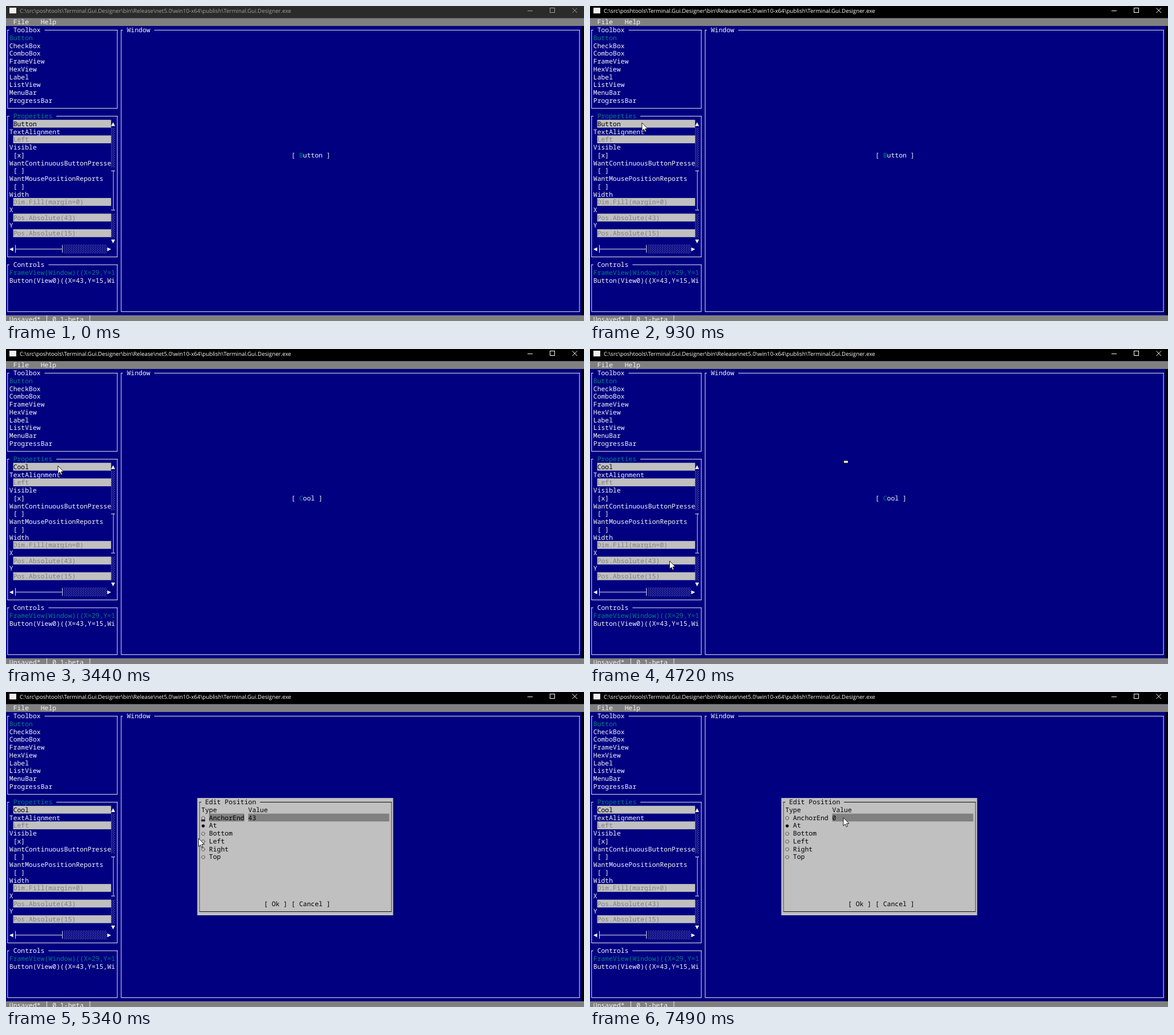
These frames come from a looping animation (1013x553 px, 8000 ms). An HTML page with a canvas:

```html
<!DOCTYPE html>
<html lang="en">
<head>
<meta charset="utf-8">
<title>Terminal designer</title>
<style>
html, body { margin: 0; width: 100%; height: 100%; overflow: hidden; background: #000080; }
canvas { display: block; width: 1013px; height: 553px; }
</style>
</head>
<body>
<canvas id="stage"></canvas>
<script>
const W = 1013, H = 553, LOOP = 8000;
// Character grid: 8 by 16 units per cell, drawn at a fractional scale
const UNIT = 0.8581, CW = 8 * UNIT, CH = 16 * UNIT, X0 = -1.1, Y0 = 21.3, LINE = 0.95;
const NAVY = "#000080", TEAL = "#008080", GRAY = "#808080", SILVER = "#c0c0c0";
const WHITE = "#f6f6f6", BLACK = "#000";
const MONO = '11.44px "Noto Sans Mono", "DejaVu Sans Mono", monospace';
const SANS = '9.76px "Open Sans", "Noto Sans", sans-serif';

const canvas = document.getElementById("stage");
const ctx = canvas.getContext("2d");
const dpr = window.devicePixelRatio || 1;
canvas.width = W * dpr;
canvas.height = H * dpr;

const colX = c => X0 + c * CW;
const rowY = r => Y0 + r * CH;
const midX = c => colX(c) + 4 * UNIT;
const midY = r => rowY(r) + 8 * UNIT;

// Timeline: [start, value]
const FIELD = [[0, "Button"], [1410, "Butto"], [1570, "Butt"], [1730, "But"], [1890, "Bu"],
  [2050, "B"], [2130, ""], [2360, "C"], [2670, "Co"], [2840, "Coo"], [3000, "Cool"]];
const VALUE = [[0, "43"], [7090, "4"], [7240, ""], [7490, "0"]];
const CARET_ON = [[1890, 2450], [2920, 3440], [3940, 4500]];
const ACTIVE_AT = 860, DIALOG_AT = 4790, TYPE_CARET_AT = 5030, VALUE_FOCUS_AT = 5800;

// Pointer moves: evenly spaced path points, sampled in n held steps
const MOVES = [
  { at: 70, dt: 78.8, n: 10, path: [[640, 545], [390, 396], [180, 262], [91, 205]] },
  { at: 3940, dt: 78, n: 11, path: [[92, 209], [102, 252], [121, 318], [135, 361], [139.5, 372]] },
  { at: 4950, dt: 78, n: 11, path: [[146, 368], [235, 320], [337.5, 257], [425, 194], [444, 220.5]] }
];

const at = (steps, t) => steps.filter(s => s[0] <= t).pop()[1];

function pointer(t) {
  const move = MOVES.filter(m => m.at <= t).pop();
  if (!move) return null;
  const k = Math.min(move.n - 1, Math.floor((t - move.at) / move.dt));
  const u = k / (move.n - 1) * (move.path.length - 1);
  const i = Math.min(Math.floor(u), move.path.length - 2);
  const a = move.path[i], b = move.path[i + 1];
  return [0, 1].map(d => a[d] + (b[d] - a[d]) * (u - i));
}

function box(x, y, w, h, color) {
  ctx.fillStyle = color;
  ctx.fillRect(x, y, w, h);
}

function cells(c, r, cols, color, rows = 1) {
  box(colX(c), rowY(r), cols * CW, rows * CH, color);
}

function print(text, c, r, color = WHITE) {
  ctx.font = MONO;
  ctx.fillStyle = color;
  const y = rowY(r) + 13 * UNIT;
  [...text].forEach((ch, i) => { if (ch !== " ") ctx.fillText(ch, colX(c + i), y); });
}

function hline(x1, x2, r, color = WHITE) { box(x1, midY(r), x2 - x1, LINE, color); }
function vline(c, y1, y2, color = WHITE) { box(midX(c), y1, LINE, y2 - y1, color); }

function frame(title, c1, r1, c2, r2, titleColor = WHITE, color = WHITE, side = color) {
  const left = midX(c1), right = midX(c2) + LINE;
  vline(c1, midY(r1), midY(r2), side);
  vline(c2, midY(r1), midY(r2), side);
  hline(left, colX(c1 + 1), r1, color);
  hline(colX(c1 + 3 + title.length), right, r1, color);
  hline(left, right, r2, color);
  print(title, c1 + 2, r1, titleColor);
}

function shade(c, r, cols, rows) {
  const x1 = Math.round(colX(c)), x2 = colX(c + cols), y2 = rowY(r + rows);
  let odd = 0;
  for (let y = Math.round(rowY(r)); y < y2; y += 2, odd ^= 1)
    for (let x = x1 + odd; x < x2 - 0.5; x += 3) box(x, y, 1, 1, "#a4a4cc");
}

function shape(points, x, y, fill, stroke) {
  ctx.beginPath();
  points.forEach(p => ctx.lineTo(x + p[0], y + p[1]));
  ctx.closePath();
  ctx.fillStyle = fill;
  ctx.fill();
  if (stroke) {
    ctx.strokeStyle = stroke;
    ctx.lineWidth = 0.9;
    ctx.stroke();
  }
}

// Triangle in a cell, turned by quarter turns from "up"
function arrow(c, r, turns) {
  ctx.save();
  ctx.translate(colX(c + 0.5), rowY(r + 0.5) + 0.8);
  ctx.rotate(turns * Math.PI / 2);
  shape([[0, -3.4], [3.4, 3.4], [-3.4, 3.4]], 0, 0, WHITE);
  ctx.restore();
}

function caret(c, r, color) {
  box(colX(c), rowY(r + 0.75), CW, CH / 4, color);
}

function titleBar(active) {
  const ink = active ? "#fff" : "#a0a0a0";
  box(0, 0, W, Y0, active ? BLACK : "#2b2b2b");
  box(6, 3, 12, 10, "#f0f0f0");
  ctx.font = SANS;
  ctx.fillStyle = ink;
  ctx.fillText("C:\\src\\poshtools\\Terminal.Gui.Designer\\bin\\Release\\net5.0\\win10-x64\\publish\\Terminal.Gui.Designer.exe", 24, 12);
  ctx.strokeStyle = ink;
  ctx.lineWidth = 1;
  box(914, 8, 9, 1, ink);
  ctx.strokeRect(953.5, 3.5, 8, 8);
  ctx.beginPath();
  ctx.moveTo(992.5, 3.5); ctx.lineTo(1001, 12);
  ctx.moveTo(1001, 3.5); ctx.lineTo(992.5, 12);
  ctx.stroke();
}

function bars() {
  box(0, Y0, W, CH, GRAY);
  print("File", 2, 0);
  print("Help", 9, 0);
  box(0, rowY(38), W, CH, GRAY);
  print("Unsaved*", 1, 38);
  print("0.1-beta", 12, 38);
  vline(10, rowY(38), H);
  vline(21, rowY(38), H);
}

function toolbox() {
  frame("Toolbox", 0, 1, 28, 11);
  "Button CheckBox ComboBox FrameView HexView Label ListView MenuBar ProgressBar".split(" ")
    .forEach((name, i) => print(name, 1, 2 + i, i ? WHITE : TEAL));
}

function properties(text) {
  frame("Properties", 0, 12, 28, 30, TEAL);
  const rows = [["TextAlignment", "Left"], ["Visible", "[x]"], ["WantContinuousButtonPresse", "[ ]"],
    ["WantMousePositionReports", "[ ]"], ["Width", "Dim.Fill(margin=0)"],
    ["X", "Pos.Absolute(43)"], ["Y", "Pos.Absolute(15)"]];
  cells(2, 13, 25, SILVER);
  print(text, 2, 13, BLACK);
  rows.forEach(([name, value], i) => {
    const r = 14 + i * 2, check = value[0] === "[";
    print(name, 1, r);
    if (!check) cells(2, r + 1, 25, SILVER);
    print(value, 2, r + 1, check ? WHITE : GRAY);
  });

  arrow(27, 13, 0);
  shade(27, 14, 1, 5);
  hline(colX(27), colX(28), 19);
  vline(27, midY(19), midY(24), "#f4dce0");
  hline(colX(27), colX(28), 24);
  shade(27, 25, 1, 3);
  arrow(27, 28, 2);

  arrow(1, 29, 3);
  vline(2, rowY(29), rowY(30));
  hline(midX(2), midX(14), 29);
  vline(14, rowY(29), rowY(30));
  shade(15, 29, 11, 1);
  arrow(26, 29, 1);
}

function controls() {
  frame("Controls", 0, 31, 28, 37);
  print("FrameView(Window)({X=29,Y=1", 1, 32, TEAL);
  print("Button(View0)({X=43,Y=15,Wi", 1, 33);
}

function preview(text) {
  frame("Window", 29, 1, 146, 37);
  print("[ " + " ".repeat(text.length) + " ]", 73, 17);
  print(text.slice(0, 1), 75, 17, TEAL);
  print(text.slice(1), 76, 17);
}

function radio(r, on) {
  ctx.beginPath();
  ctx.arc(colX(50.5), rowY(r + 0.5) + 1, on ? 2.7 : 2.9, 0, Math.PI * 2);
  if (on) {
    ctx.fillStyle = BLACK;
    ctx.fill();
  } else {
    ctx.strokeStyle = "#202020";
    ctx.lineWidth = 1;
    ctx.setLineDash([1.5, 0.8]);
    ctx.stroke();
    ctx.setLineDash([]);
  }
}

function dialog(t) {
  cells(49, 12, 50, SILVER, 15);
  frame("Edit Position", 49, 12, 98, 26, BLACK, BLACK, "#6b4010");
  print("Type", 50, 13, BLACK);
  print("Value", 62, 13, BLACK);
  if (t < VALUE_FOCUS_AT) cells(52, 14, 9, GRAY);
  ["AnchorEnd", "At", "Bottom", "Left", "Right", "Top"].forEach((name, i) => {
    radio(14 + i, i === 1);
    print(name, 52, 14 + i, BLACK);
  });
  cells(62, 14, 36, GRAY);
  print(at(VALUE, t), 62, 14, BLACK);
  print("[ Ok ] [ Cancel ]", 66, 25, BLACK);
  if (t >= TYPE_CARET_AT && t < VALUE_FOCUS_AT) caret(50, 14, "#401830");
}

function draw(t) {
  ctx.setTransform(dpr, 0, 0, dpr, 0, 0);
  ctx.textRendering = "geometricPrecision";
  const text = at(FIELD, t);
  box(0, 0, W, H, NAVY);
  box(colX(147), rowY(1), W, 37 * CH, BLACK);
  titleBar(t >= ACTIVE_AT);
  bars();
  toolbox();
  properties(text);
  controls();
  preview(text);
  if (CARET_ON.some(([a, b]) => t >= a && t < b)) caret(2 + text.length, 13, "#3f3f3f");
  if (t >= 4720 && t < DIALOG_AT) caret(65, 12, "#ffff7f");
  if (t >= DIALOG_AT) dialog(t);
  const p = pointer(t);
  if (p) shape([[0, 0], [0, 14.3], [3.3, 11.3], [5.4, 16.2], [7.6, 15.2], [5.6, 10.5], [10, 10.3]],
    p[0], p[1], "#fff", "#000");
}

const start = performance.now();
function tick() {
  draw((performance.now() - start) % LOOP);
  requestAnimationFrame(tick);
}
tick();
</script>
</body>
</html>
```
